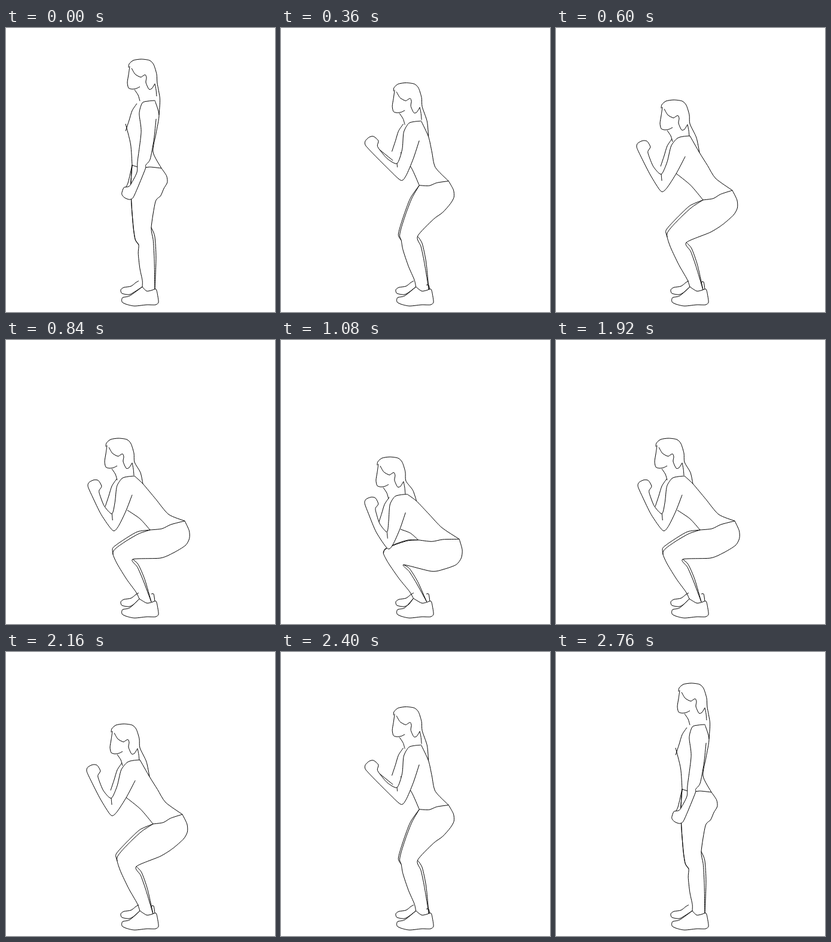
An HTML page with a canvas for the animation above (2.88 s loop, 450 px wide and 474 px high).

```html
<!DOCTYPE html>
<html lang="en">
<head>
<meta charset="utf-8">
<title>Squat</title>
<style>
html, body { margin: 0; width: 100%; height: 100%; overflow: hidden; background: #fff; }
canvas { display: block; }
</style>
</head>
<body>
<canvas id="stage" width="450" height="474"></canvas>
<script>
const ctx = document.getElementById('stage').getContext('2d');
const STEP = 120, LOOP = 2880;

// Progress through the key poses (stand, half squat, low, bottom) on the way down.
const DESCENT = [0, 0.17, 0.36, 0.58, 0.8, 1, 1.36, 2, 2.42, 2.76, 3, 3.08];

// Joint positions in each key pose; head is its shift from standing.
const JOINTS = {
  head: [[0, 0], [-29, 68], [-38, 112], [-46, 153]],
  shoulder: [[228, 125], [203, 184], [194, 231], [189, 271]],
  elbow: [[230, 213], [177, 258], [178, 304], [177, 344]],
  chest: [[200, 160], [200, 242], [203, 284], [199, 326]],
  back: [[256, 145], [240, 208], [229, 240], [226, 278]],
  lumbar: [[246, 207], [267, 251], [272, 291], [268, 320]],
  waist: [[260, 234], [295, 271], [299, 302], [298, 342]],
  groin: [[211, 229], [246, 287], [241, 317], [226, 339]],
  seat: [[264, 268], [297, 312], [300, 343], [291, 385]],
  thigh: [[250, 290], [258, 341], [258, 364], [250, 393]],
  kneeBack: [[243, 333], [218, 358], [212, 366], [203, 378]],
  knee: [[222, 362], [186, 349], [179, 358], [169, 356]],
  ankle: [[228, 432], [224, 432], [223, 432], [221, 431]],
  heel: [[249, 436], [246, 437], [243, 437], [244, 437]]
};
const FOREARM_ANGLE = [[108.7], [239.3], [240.3], [244.8]];

// Head shapes on the standing figure.
const HAIR = [[205, 66], [206, 60], [213, 54], [226, 52], [240, 54], [247, 61], [252, 77], [253, 92]];
const HAIRLINE = [[210, 67], [216, 77], [225, 82], [229, 80], [233, 78], [235, 83], [234, 91],
  [239, 102], [244, 101], [249, 93]];
const FACE = [[207, 64], [205, 78], [203, 91], [205, 100], [211, 102], [218, 101], [224, 98]];
const THROAT = [[215, 103], [221, 112], [224, 122]];
const NAPE = [[249, 93], [251, 103], [252, 114]];

// Forearm and fist as (distance from elbow, sideways).
const FOREARM = [[12.5, 6.3], [30, 1.5], [51, 4.5], [57, 7], [61, 14], [72, 14], [76.5, 8],
  [77, -1], [72, -6], [53, -8], [20, -10]];

const SHOE = [[235, 439], [243, 438], [251, 436], [254, 448], [255, 458], [250, 462], [235, 462],
  [215, 464], [201, 461], [194, 457], [195, 450], [207, 447]];
const FAR_SHOE = [[222, 422], [217, 425], [209, 431], [197, 433], [192, 437], [194, 443],
  [206, 445], [214, 441]];

function blend(rows, p) {
  const k = Math.min(Math.floor(p), rows.length - 2);
  return rows[k].map((v, i) => v + (rows[k + 1][i] - v) * (p - k));
}

const shift = (points, [dx, dy]) => points.map(([x, y]) => [x + dx, y + dy]);

// Points given along and across a direction.
function local([ox, oy], angle, points, length = 1) {
  const c = Math.cos(angle), s = Math.sin(angle);
  return points.map(([u, v]) => [ox + u * length * c - v * s, oy + u * length * s + v * c]);
}

// The same between two joints: (fraction of the way, sideways).
function along([ax, ay], [bx, by], ...points) {
  return local([ax, ay], Math.atan2(by - ay, bx - ax), points, Math.hypot(bx - ax, by - ay));
}

// Smooth curve through all points.
function curve(points, filled) {
  const at = i => points[Math.max(0, Math.min(points.length - 1, i))];
  ctx.beginPath();
  ctx.moveTo(...points[0]);
  for (let i = 0; i < points.length - 1; i++) {
    const [a, b, c, d] = [at(i - 1), at(i), at(i + 1), at(i + 2)];
    ctx.bezierCurveTo(
      b[0] + (c[0] - a[0]) / 8, b[1] + (c[1] - a[1]) / 8,
      c[0] - (d[0] - b[0]) / 8, c[1] - (d[1] - b[1]) / 8, ...c);
  }
  if (filled) ctx.fill();
  ctx.stroke();
}

function drawLegs(j, p, bend) {
  const gap = 6 * Math.max(0, 1 - Math.abs(p - 1.5) / 1.5);
  const thighFront = out => along(j.groin, j.knee,
    [0.25, 5 + out], [0.52, 6.5 + out], [0.78, 6.5 + out], [0.93, 5 + out]);
  curve([...FAR_SHOE, j.ankle]);
  if (bend) curve([[243, 436 - 12 * bend], [247, 436 - 12 * bend], [249, 436]]);
  curve([j.groin, ...thighFront(gap), j.knee]);
  curve([j.groin, ...thighFront(0), j.knee,
    ...along(j.knee, j.ankle, [0.2, 2], [0.55, 1.5], [0.85, -1]), j.ankle]);
  curve([j.waist, ...along(j.waist, j.seat, [0.4, -7], [0.72, -7]), j.seat,
    ...along(j.seat, j.thigh, [0.5, -2]), j.thigh, j.kneeBack,
    ...along(j.kneeBack, j.heel, [0.2, -2], [0.5, -2]), j.heel]);
  curve([j.kneeBack, ...along(j.kneeBack, j.heel, [0.15, -5], [0.5, -5]), j.heel]);
  curve([j.ankle, ...SHOE, j.ankle]);
}

function drawTorso(j) {
  curve([...shift([[21, -4]], j.shoulder), j.back,
    ...along(j.back, j.lumbar, [0.5, 0]), j.lumbar, j.waist]);
  curve([j.groin, ...along(j.groin, j.waist, [0.33, 3], [0.6, 0]), j.waist]);
  curve([j.chest, ...along(j.chest, j.groin, [0.5, -3]), j.groin]);
  curve(shift([[-9, 1], [-17, 13], [-22, 29], [-28, 47]], j.shoulder));
}

function drawHead(j) {
  for (const shape of [HAIRLINE, FACE, THROAT, NAPE]) curve(shift(shape, j.head));
  const hair = shift(HAIR, j.head);
  curve([...hair, ...along(hair[hair.length - 1], j.back, [0.5, -3]), j.back]);
}

function drawArm(j, p, bend) {
  // The forearm swings up ahead of the body.
  const lead = p < 1 ? 1 - (1 - p) ** 2.3 : p;
  const angle = blend(FOREARM_ANGLE, lead)[0] * Math.PI / 180;
  const straight = 1 - bend;
  if (straight) curve(local(j.elbow, angle, [[21, 13 * straight], [51, 10 * straight], [66, 12 * straight]]));
  const forearm = local(j.elbow, angle, FOREARM);
  curve([
    ...shift([[21, -4], [10, -3], [0, 0]], j.shoulder),
    ...along(j.shoulder, j.elbow, [0.2, 5.5], [0.55, 3]),
    ...forearm,
    ...along(j.shoulder, j.elbow, [1.18, -3.5], [1.07, -11], [0.7, -18], [0.31, -22.5])
  ], true);
  const [x, y] = forearm[0];
  curve([[x, y], [x + bend, y + 11 * bend]]);
}

function draw(now) {
  const step = Math.floor((now % LOOP) / STEP);
  const p = DESCENT[Math.min(step, 23 - step)];
  const bend = Math.min(p, 1);
  const j = {};
  for (const name in JOINTS) j[name] = blend(JOINTS[name], p);
  ctx.fillStyle = '#fff';
  ctx.fillRect(0, 0, 450, 474);
  ctx.strokeStyle = '#000';
  ctx.lineWidth = 1;
  ctx.lineJoin = 'round';
  drawLegs(j, p, bend);
  drawTorso(j);
  drawHead(j);
  drawArm(j, p, bend);
}

const start = performance.now();
function tick() {
  draw(performance.now() - start);
  requestAnimationFrame(tick);
}
tick();
</script>
</body>
</html>
```
